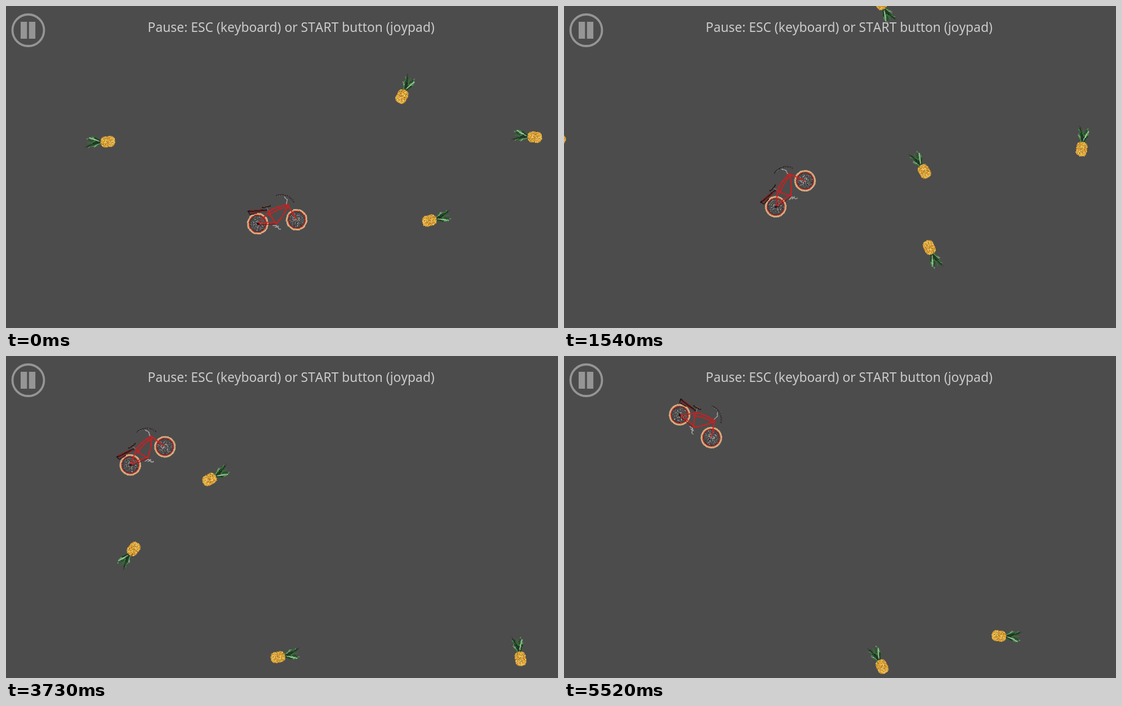
Animation, 980 px wide and 571 px high, one loop 5.62 s. Source, as an HTML page with a canvas:

```html
<!DOCTYPE html>
<html lang="en">
<head>
<meta charset="utf-8">
<title>Bicycle and pineapples</title>
<style>
  html, body { margin: 0; width: 100%; height: 100%; overflow: hidden; background: #4c4c4c; }
  canvas, svg { position: absolute; left: 0; top: 0; width: 980px; height: 571px; }
  text { font: 22.85px "Noto Sans", "Open Sans", sans-serif; font-kerning: none; fill: #cbcbcb; }
</style>
</head>
<body>
<canvas id="stage" width="980" height="571"></canvas>
<svg viewBox="0 0 980 571">
  <circle cx="39.5" cy="43" r="28" fill="none" stroke="#959595" stroke-width="3.8"/>
  <path d="M26 28h11.3v30H26zM40.8 28h11.3v30H40.8z" fill="#959595"/>
  <text x="251.6" y="46">Pause: ESC (keyboard) or START button (joypad)</text>
</svg>
<script>
const LOOP = 5620, FIRST = 60, LAST = 5520;
const ctx = document.getElementById('stage').getContext('2d');
ctx.imageSmoothingEnabled = false;

// Key points of the ride: time, x, y, tilt. A smooth curve joins them.
const RIDE = [
  [0, 481.5, 382.5, -5.8], [890, 458.5, 383, -21.8], [1540, 402, 333, -41.5],
  [2410, 327.5, 252, -45.6], [2800, 306, 178, -38], [3270, 353, 168, -27.3],
  [4290, 103, 176, -31], [4690, 50, 96, -35], [4980, 90, 62, -8], [5520, 233.5, 124.5, 35.7]
];

// A thrown fruit drifts in a straight line while its spin changes steadily.
// t0 is the time in seconds at which it has the given place and angle.
function thrown(t0, x, y, vx, vy, angle, spin, gain) {
  return time => {
    const s = time / 1000 - t0;
    return [x + vx * s, y + vy * s, angle + spin * s + gain * s * s / 2];
  };
}

const FRUIT = [
  thrown(0, 925, 231, -189.5, 32.7, 186, -124, -97),
  thrown(0, 709, 148, -91, -92, -64, 209, 136),
  thrown(0, 167, 241, -118, 6.7, 178, 509, -105),
  thrown(0, 765, 377, -72, 41.4, -15, 283, 4),
  thrown(1.54, 921, 240, -250, -12.7, -83, 10, 13),
  thrown(4.29, 801, 528, -197, 8.5, -4, 181, 33),
  thrown(5.52, 786, 497, -324, 0, 2, 180, 0)
];

function random(seed) {
  return () => (seed = (seed * 16807) % 2147483647) / 2147483647;
}

function sprite(size, seed, draw) {
  const cv = document.createElement('canvas');
  cv.width = cv.height = size;
  const c = cv.getContext('2d');
  c.translate(size / 2, size / 2);
  c.lineCap = c.lineJoin = 'round';
  const rnd = random(seed);
  draw(c, rnd, list => list[Math.floor(rnd() * list.length)]);
  return cv;
}

function stroke(c, color, width, d) {
  c.strokeStyle = color;
  c.lineWidth = width;
  c.stroke(new Path2D(d));
}

function ring(c, color, width, x, r) {
  c.strokeStyle = color;
  c.lineWidth = width;
  c.beginPath();
  c.arc(x, 0, r, 0, 7);
  c.stroke();
}

const pineapple = sprite(64, 77, (c, rnd, pick) => {
  const greens = ['#1b3a1d', '#2a6a2e', '#2f7a33', '#4b8f4e', '#7fae82', '#142615', '#a9c9ab'];
  for (let i = 0; i < 52; i++) {
    const x = -3 + rnd() * 17, side = (i % 2 * 2 - 1) * Math.sqrt(rnd());
    const tip = Math.min(26.5, x + 7 + rnd() * 8);
    stroke(c, pick(greens), 0.8 + rnd() * 0.8,
      `M${x} ${side * 3}Q${(x + tip) / 2} ${side * 5} ${tip} ${side * 9.5}`);
  }
  c.beginPath();
  c.roundRect(-26.7, -9.7, 25.7, 19.4, 8);
  c.fillStyle = '#d7a23c';
  c.fill();
  c.clip();
  const skin = ['#ffe36a', '#f0c040', '#a86c1c', '#7c511c', '#fff0b4', '#d98a20'];
  for (let i = 0; i < 260; i++) {
    c.fillStyle = pick(skin);
    c.fillRect(Math.floor(rnd() * 27) - 27, Math.floor(rnd() * 20) - 10, 1, 1);
  }
});

const bike = sprite(128, 41, (c, rnd, pick) => {
  const red = '#d51c1c', dark = '#1f1818', steel = '#a9a9a9';
  for (const x of [-34.7, 34.7]) {
    for (let i = 0; i < 170; i++) {
      const a = Math.floor(rnd() * 24) * Math.PI / 12, r = 2 + rnd() * 12;
      c.fillStyle = pick(['#222', '#777', '#999', '#bbb']);
      c.fillRect(Math.round(x + Math.cos(a) * r), Math.round(Math.sin(a) * r), 1, 1);
    }
    ring(c, '#2b2323', 0.8, x, 14.2);
    ring(c, '#d2b083', 3.1, x, 17.5);
    ring(c, '#d42c22', 1.4, x, 15.4);
  }
  // rack and saddle
  stroke(c, dark, 3.2, 'M-49-23.5L-32-23 -17-22');
  stroke(c, '#8e2020', 1.3, 'M-49-20.5L-34-20 -18-21.5M-46-24.5L-26-24');
  stroke(c, dark, 1.3, 'M-49-23L-47.5-17.5 -34.7-18.5');
  stroke(c, dark, 2.6, 'M-23.5-27.8L-16-28 -10-29.4');
  stroke(c, '#8a4a3a', 1, 'M-22-28.6L-11-30');
  stroke(c, '#777', 1.2, 'M-16-27L-13-20');
  // frame
  stroke(c, red, 1.9, 'M21.4-27.5Q3-28-12.6-19.9M22-24Q2-23-14-13');
  stroke(c, red, 2, 'M21.5-26Q15-12-1.8 3.3M-13-20.5L-10-10 -1.8 3.3M20.4-29.5L24-23 34.7 0');
  stroke(c, red, 1.7, 'M-12.6-19L-34.7 0 -18-.5 -1.8 1.5');
  stroke(c, '#8a1515', 1.2, 'M-33 2.2L-3 4.2');
  // crank and hubs
  stroke(c, steel, 1.6, 'M-8 6.5L-2 6 1.5 13.5 4.5 13.8M-4 9L2 8.5M34.5 0h.5');
  stroke(c, dark, 3.4, 'M-35.5.3h1.5');
  // stem and handlebar
  stroke(c, steel, 1.4, 'M17.5-42.8L21.3-36.5 19.8-30');
  stroke(c, dark, 1.7, 'M3.2-45.6Q10-48.5 17-45.4Q30-42 32.8-31.5');
  c.setLineDash([1.5, 2.5]);
  stroke(c, '#9a8a84', 0.9, 'M4-45.4Q10-47 17-45Q30-42 32-33');
});

function ridePose(t) {
  const last = RIDE.length - 1;
  const i = Math.max(0, RIDE.findIndex(k => k[0] >= t) - 1);
  const a = RIDE[i], b = RIDE[i + 1];
  const p = RIDE[Math.max(0, i - 1)], q = RIDE[Math.min(last, i + 2)];
  const d = b[0] - a[0], u = (t - a[0]) / d, ease = u * u * (3 - 2 * u);
  return a.map((v, n) => {
    const m0 = (b[n] - p[n]) / (b[0] - p[0]) * d;
    const m1 = (q[n] - a[n]) / (q[0] - a[0]) * d;
    return v + (b[n] - v) * ease + m0 * u * (1 - u) ** 2 - m1 * u * u * (1 - u);
  }).slice(1);
}

function put(img, [x, y, angle]) {
  ctx.save();
  ctx.translate(x, y);
  ctx.rotate(angle * Math.PI / 180);
  ctx.drawImage(img, -img.width / 2, -img.height / 2);
  ctx.restore();
}

function render() {
  const now = performance.now() % LOOP;
  const t = now < FIRST ? 0 : Math.min(now, LAST);
  ctx.clearRect(0, 0, 980, 571);
  put(bike, ridePose(t));
  for (const place of FRUIT) put(pineapple, place(t));
  requestAnimationFrame(render);
}
render();
</script>
</body>
</html>
```
